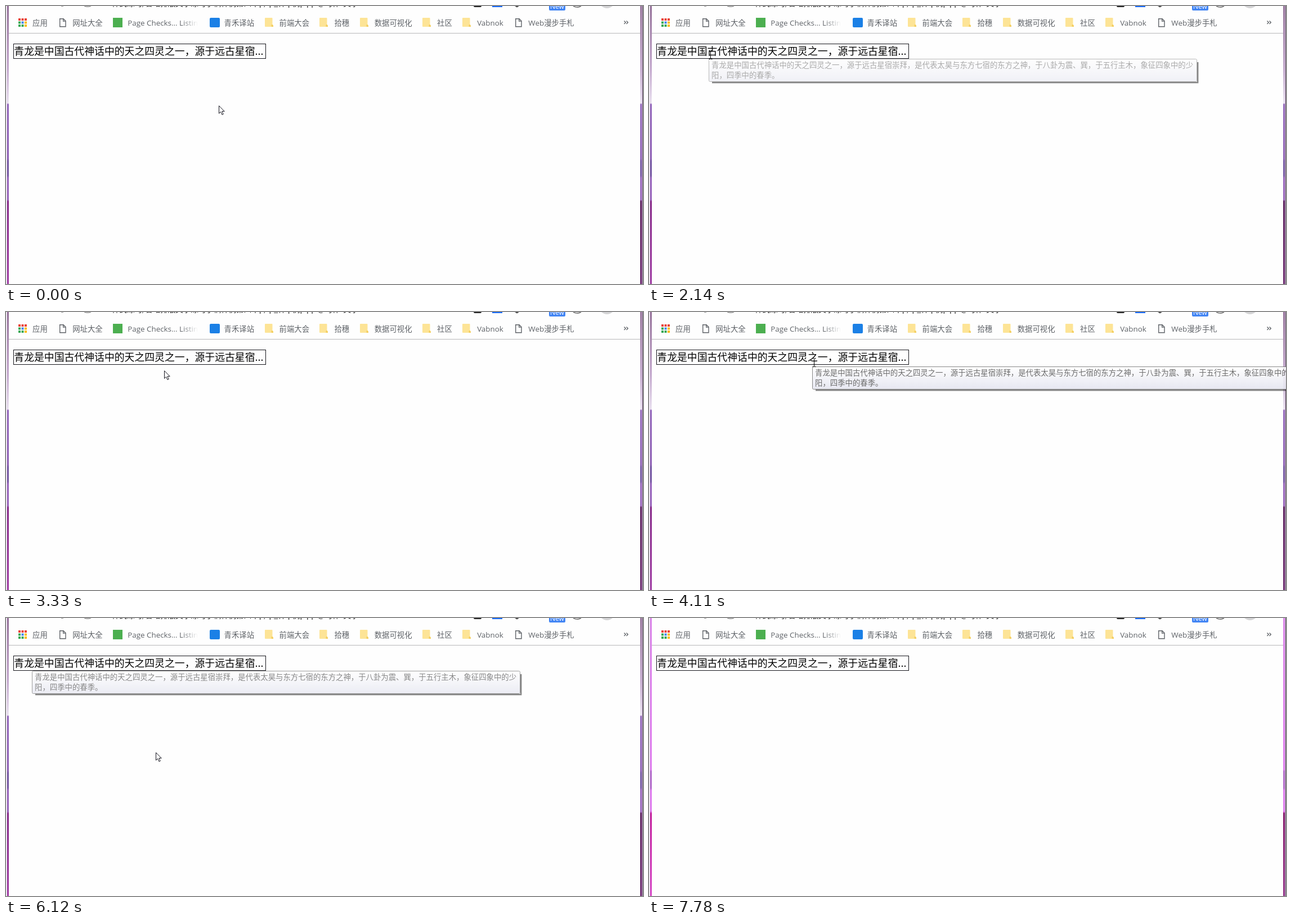
An HTML page for the animation above (7.81 s loop, 1132 px wide and 495 px high).

```html
<!DOCTYPE html>
<html lang="zh-CN">
<head>
<meta charset="utf-8">
<title>Tooltip demo</title>
<style>
html, body { margin: 0; width: 100%; height: 100%; overflow: hidden; background: #fefefe; }
svg { position: absolute; left: 0; top: 0; display: block; }
text { font-family: "Open Sans", "Noto Sans CJK SC", "Noto Sans CJK", sans-serif; white-space: pre; }
.cjk { font-family: "Noto Sans CJK SC", "Noto Sans CJK", sans-serif; font-weight: 350; }
body {
  --glass: linear-gradient(#947098, #c4a9ce 113px, #ece4f2 173px, #9468bc 175px, #8e60b6 272px,
    #7558a4 276px 302px, #9864bc 306px 345px, #862888 348px, #a03ca4);
}
body.lit {
  --glass: linear-gradient(#dc86ea, #e07cf0 270px, #b46ccc 273px 303px, #e07cf0 307px 344px,
    #c41c9c 348px, #d848c8);
}
.edge { position: absolute; top: 0; height: 495px; width: 3px; background: var(--glass); }
#left { left: 1px; border-left: 1px solid #dccde2; }
#right {
  left: 1127px;
  border-right: 1px solid #dccde2;
  background: linear-gradient(transparent 346px, #0005 347px), var(--glass);
}
#rim { position: absolute; left: 1131px; top: 0; width: 1px; height: 495px; background: #4c3852; }
</style>
</head>
<body>
<div class="edge" id="left"></div>
<div class="edge" id="right"></div>
<div id="rim"></div>
<svg width="1132" height="495" viewBox="0 0 1132 495">
  <defs>
    <linearGradient id="fade" gradientUnits="userSpaceOnUse" x1="312" x2="341" y1="0" y2="0">
      <stop stop-color="#5f6368"/><stop offset="1" stop-color="#5f6368" stop-opacity="0"/>
    </linearGradient>
    <linearGradient id="tipFill" x2="0" y2="1">
      <stop stop-color="#fff"/><stop offset="1" stop-color="#e4e5f0"/>
    </linearGradient>
    <g id="doc" fill="none" stroke="#5f6368" stroke-width="1.4">
      <path d="M3.700 1.700H10L14 5.800V15.800H3.700Z"/><path d="M9.700 1.900V6.100H13.900"/>
    </g>
    <g id="folder">
      <path d="M1 0H12.500Q13.500 0 13.500 1V12L15 14V16H1Q0 16 0 15V1Q0 0 1 0Z" fill="#fde496"/>
      <path d="M11.500 16V13.200Q11.500 12 12.700 12H13.500L15 14V16Z" fill="#f4cf62"/>
    </g>
    <rect id="green" width="17" height="17" fill="#4caf50"/>
    <rect id="blue" width="18" height="17" rx="2" fill="#1b80e6"/>
    <g id="apps"></g>
  </defs>

  <!-- cropped address bar -->
  <path d="M98 0h4M139 0q6 2.400 12 0" fill="none" stroke="#777" stroke-width="1.300"/>
  <text class="cjk" x="188" y="0" font-size="13.500" fill="#222">样式练习/省略排版文字练习手稿样例第四章p/ip_样ip例p pp @习作  文字</text>
  <path d="M831 0h14q0 2-2 2h-10q-2 0-2-2Z" fill="#222"/>
  <path d="M864 0h18v2h-18Z" fill="#1769f5"/>
  <path d="M904 0h8l-4 2.500Z" fill="#444"/>
  <path d="M965 0h29v6q0 2-2 2h-25q-2 0-2-2Z" fill="#4285f4"/>
  <text x="967" y="5" font-size="12" fill="#fff">New</text>
  <path d="M1008 0q7 4 14 0" fill="none" stroke="#666" stroke-width="1.500"/>
  <path d="M1058 0q10 8 20 0Z" fill="#d4d4d6"/>

  <g id="marks" font-size="13.400" fill="#5f6368"></g>
  <path d="M1098.500 26.500l2.700 2.700-2.700 2.700M1102.500 26.500l2.700 2.700-2.700 2.700" fill="none" stroke="#5f6368" stroke-width="1.400"/>
  <path d="M5 48.500H1127" stroke="#b8b8ba"/>

  <rect x="13.500" y="67.500" width="448" height="26" fill="none" stroke="#16161c"/>
  <text class="cjk" x="14.300" y="87" font-size="17.850">青龙是中国古代神话中的天之四灵之一，源于远古星宿...</text>

  <g id="tip">
    <path d="M6 42.200H869.200V6" fill="none" stroke="#000" stroke-opacity=".48" stroke-width="2.400"/>
    <g id="pane">
      <rect x=".5" y=".5" width="867" height="40" rx="2" fill="url(#tipFill)" stroke="#767676"/>
      <g font-size="13.380" fill="#575757">
        <text class="cjk" x="5" y="16">青龙是中国古代神话中的天之四灵之一，源于远古星宿崇拜，是代表太昊与东方七宿的东方之神，于八卦为震、巽，于五行主木，象征四象中的少</text>
        <text class="cjk" x="5" y="34">阳，四季中的春季。</text>
      </g>
    </g>
  </g>

  <path id="arrow" d="M.5 .7V14.300L3.600 11.400L6 16.600L8.200 15.600L5.900 10.600H10.200Z" fill="#fff" stroke="#15151f"/>
  <path id="beam" d="M-3 -7.500H-.5M.5 -7.500H3M0 -7V7M-3 7.500H-.5M.5 7.500H3" fill="none" stroke="#000"/>
</svg>
<script>
const LOOP = 7810, FLASH = 7780, HIDE = 190;
const $ = id => document.getElementById(id);
const clamp = v => Math.max(0, Math.min(1, v));

function add(parent, tag, attrs, text = '') {
  const el = document.createElementNS('http://www.w3.org/2000/svg', tag);
  for (const k in attrs) el.setAttribute(k, attrs[k]);
  el.textContent = text;
  return parent.appendChild(el);
}

const palette = { r: '#ea4335', g: '#34a853', b: '#4285f4', y: '#fbbc05' };
[...'rrrgbyggy'].forEach((c, i) => add($('apps'), 'rect', {
  x: 1 + i % 3 * 5.5, y: 1 + Math.floor(i / 3) * 5.5, width: 4, height: 4, fill: palette[c]
}));

// Bookmarks flow from left to right
const ICON = 26, GAP = 18.4, MAX_LABEL = 127;
let left = 21;
for (const [icon, label] of [
  ['apps', '应用'], ['doc', '网址大全'], ['green', 'Page Checks... Listing'], ['blue', '青禾译站'],
  ['folder', '前端大会'], ['folder', '拾穗'], ['folder', '数据可视化'], ['folder', '社区'],
  ['folder', 'Vabnok'], ['doc', 'Web漫步手札']
]) {
  add($('marks'), 'use', { href: '#' + icon, x: Math.round(left), y: 21 });
  const text = add($('marks'), 'text', { x: left + ICON, y: 34.8 }, label);
  const width = text.getComputedTextLength();
  if (width > MAX_LABEL) text.setAttribute('fill', 'url(#fade)');
  left += ICON + Math.min(width, MAX_LABEL) + GAP;
}

// Each trip is one curve with an ease-out; a tip may open where it ends
const trips = [
  { from: 120, to: 910, bend: [322, 136], end: [312, 146] },
  { from: 935, to: 1790, bend: [105, 123], end: [109, 87], tip: { show: 2080, rise: 180, hide: 2930 } },
  { from: 2830, to: 3550, bend: [229, 173], end: [293, 90], tip: { show: 3930, rise: 240, hide: 4950 } },
  { from: 4640, to: 5300, bend: [73, 128], end: [49, 87], tip: { show: 5710, rise: 30, hide: 6065 } },
  { from: 6020, to: 6720, bend: [422, 400], end: [1041, 500] }
];
trips.forEach((trip, i) => trip.start = i ? trips[i - 1].end : [378, 177]);

function pointerAt(t) {
  const { from, to, start, bend, end } = trips.findLast(p => t >= p.from) || trips[0];
  const s = 1 - (1 - clamp((t - from) / (to - from))) ** 2;
  return start.map((a, i) =>
    Math.round((1 - s) ** 2 * a + 2 * s * (1 - s) * bend[i] + s * s * end[i]));
}

function tipOpacity(t, { show, rise, hide }) {
  const shown = (Math.floor((t - show) / 30) + 1) * 30 / rise;
  return Math.min(clamp(shown), clamp(1 - (t - hide) / HIDE));
}

const place = (el, x, y) => el.setAttribute('transform', `translate(${x} ${y})`);
const toggle = (el, on) => el.style.display = on ? '' : 'none';

function draw(t) {
  const [x, y] = pointerAt(t);
  const overText = x > 13 && x < 462 && y > 67 && y < 94;
  toggle($('arrow'), !overText);
  toggle($('beam'), overText);
  place($('arrow'), x, y);
  place($('beam'), x + .5, y);

  const open = trips.find(({ tip }) => tip && t >= tip.show && t < tip.hide + HIDE);
  toggle($('tip'), open);
  if (open) {
    place($('tip'), open.end[0] - 3, open.end[1] + 7);
    $('pane').setAttribute('opacity', tipOpacity(t, open.tip));
  }
  document.body.classList.toggle('lit', t >= FLASH);
}

const begin = performance.now();
function tick() {
  draw((performance.now() - begin) % LOOP);
  requestAnimationFrame(tick);
}
tick();
</script>
</body>
</html>
```
